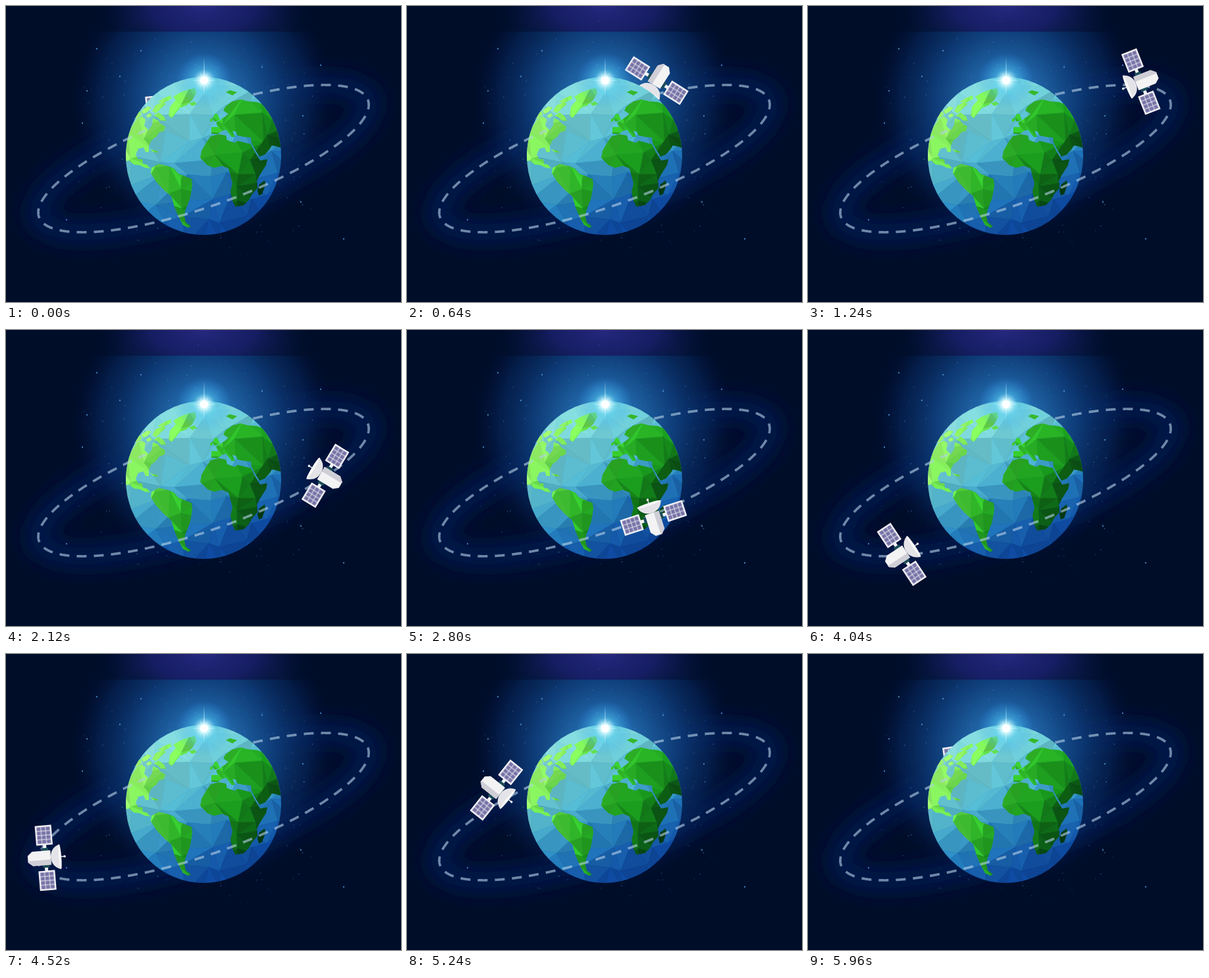
Write an HTML page that moves like this. It is 600 px wide and 450 px high and loops after 6 s.

```html
<!DOCTYPE html>
<html lang="en">
<head>
<meta charset="utf-8">
<title>Satellite in orbit</title>
<style>
html, body { margin: 0; width: 100%; height: 100%; overflow: hidden; background: #000d29; }
svg { display: block; width: 600px; height: 450px; }
</style>
</head>
<body>
<svg viewBox="0 0 600 450">
  <defs>
    <radialGradient id="halo">
      <stop offset="0" stop-color="#2f86cc"/>
      <stop offset=".3" stop-color="#1d5e9f"/>
      <stop offset=".55" stop-color="#0f3f7d" stop-opacity=".9"/>
      <stop offset=".8" stop-color="#07285f" stop-opacity=".6"/>
      <stop offset="1" stop-color="#021340" stop-opacity="0"/>
    </radialGradient>
    <radialGradient id="indigo">
      <stop offset="0" stop-color="#26287f"/>
      <stop offset=".5" stop-color="#1b1f6c" stop-opacity=".8"/>
      <stop offset="1" stop-color="#0a1545" stop-opacity="0"/>
    </radialGradient>
    <radialGradient id="flare">
      <stop offset="0" stop-color="#fff"/>
      <stop offset=".16" stop-color="#d8fbff" stop-opacity=".95"/>
      <stop offset=".4" stop-color="#57d0f8" stop-opacity=".5"/>
      <stop offset="1" stop-color="#2f9cf0" stop-opacity="0"/>
    </radialGradient>
    <filter id="blur" x="-20%" y="-60%" width="140%" height="220%"><feGaussianBlur stdDeviation="13"/></filter>
    <clipPath id="below"><rect y="39" width="600" height="411"/></clipPath>
    <clipPath id="above"><rect width="600" height="39"/></clipPath>
    <clipPath id="disc"><ellipse cx="300" cy="228" rx="118" ry="120"/></clipPath>
    <clipPath id="coast"><path d="
      M181 236L183 205 190 185 198 172 206 168 212 172 210 182 217 189 222 181 223 171 230 173 235 179 242 183 240 190 233 192 228 199 221 204 217 212 217 222 212 222 209 215 201 217 197 226 201 233 207 233 208 240 214 241 219 247 211 246 203 242 194 241 187 235Z
      M194 170L197 163 205 160 206 166 199 171Z
      M206 159L214 153 221 154 215 161 208 164Z
      M222 160L227 151 238 146 243 149 235 156 228 163Z
      M224 167L232 162 240 168 243 175 235 174 230 169Z
      M213 166L219 163 222 167 215 170Z
      M230 146L240 140 250 136 251 141 240 147Z
      M247 167L249 153 258 143 254 138 264 132 276 127 287 125 289 132 283 143 274 151 264 155 257 164 252 170Z
      M278 148L286 145 290 149 283 152Z
      M219 218L229 220 232 223 224 222Z
      M221 246L232 240 245 243 255 247 262 255 282 263 283 272 281 285 279 294 275 304 272 312 271 320 273 329 281 335 277 337 269 333 262 320 256 306 251 289 240 280 228 267 220 254Z
      M311 198L323 195 334 197 336 204 347 208 352 205 364 208 372 210 378 222 386 235 397 233 395 242 386 256 381 266 382 277 374 286 369 295 361 303 348 305 344 296 341 282 344 270 341 258 338 247 328 243 316 246 306 242 295 231 297 220 304 208Z
      M385 271L393 265 394 272 389 286 384 288 382 280Z
      M312 194L312 184 322 184 319 177 326 173 333 168 338 164 330 159 333 153 344 145 356 142 368 145 381 146 394 151 424 190 424 218 413 214 404 212 400 218 393 226 385 229 379 219 373 208 372 200 362 199 352 197 349 191 344 190 348 199 343 199 334 188 328 190 321 195Z
      M317 176L314 171 317 164 321 164 325 173Z
      M310 172L314 170 314 175 310 176Z
      M334 131L340 128 351 131 344 136Z
      M416 214L420 205 424 225Z"/></clipPath>
    <pattern id="cells" width="6.5" height="7" patternUnits="userSpaceOnUse" x="-13" y="-10.5">
      <path d="M0 0H6.5V7H0Z" fill="#e9e7f2"/><path d="M.5 .5H6V6.5H.5Z" fill="#7773a6"/>
    </pattern>
    <g id="panel">
      <path d="M-15-12.5H15V12.5H-15Z" fill="#f4f3f7"/>
      <path d="M-13-10.5H13V10.5H-13Z" fill="url(#cells)"/>
    </g>
  </defs>

  <rect width="600" height="450" fill="#000d29"/>
  <ellipse cx="300" cy="232" rx="265" ry="72" transform="rotate(-19.6 300 232)" fill="none" stroke="#041848" stroke-width="40" filter="url(#blur)"/>
  <ellipse id="glow" cx="300" cy="145" rx="200" ry="210" fill="url(#halo)" clip-path="url(#below)"/>
  <ellipse cx="300" cy="145" rx="200" ry="210" fill="url(#halo)" clip-path="url(#above)" opacity=".4"/>
  <ellipse cx="300" cy="0" rx="160" ry="82" fill="url(#indigo)" clip-path="url(#above)"/>
  <g id="stars"></g>
  <path id="orbit" fill="none" stroke="#b4cfe6" stroke-opacity=".62" stroke-width="3.7" stroke-dasharray="15 11.07"/>

  <g id="planet">
    <g clip-path="url(#disc)">
      <g id="sea"></g>
      <g id="land" clip-path="url(#coast)"></g>
      <use href="#orbit"/>
    </g>
    <circle cx="301" cy="113" r="42" fill="url(#flare)"/>
    <path id="rays" fill="#dffaff" opacity=".65"/>
    <circle cx="301" cy="113" r="6" fill="#fff"/>
  </g>

  <g id="sat">
    <path d="M-20 0H20" stroke="#f1f1f4" stroke-width="5"/>
    <path d="M-15-5H15V5H-15Z" fill="#1b4d58"/>
    <use href="#panel" x="-34.5"/><use href="#panel" x="34.5"/>
    <path d="M-11-8H11V20L5 27H-5L-11 20Z" fill="#f3f3f4"/>
    <path d="M3-8H11V20L5 27H3Z" fill="#cfced6"/>
    <path d="M-19-22Q-14-8 0-8T19-22Z" fill="#e4e4e8"/>
    <ellipse cy="-22" rx="19" ry="2" fill="#fafafa"/>
    <path d="M0-22V-29" stroke="#e8e8ee" stroke-width="1.5"/>
    <circle cy="-29" r="1.8" fill="#e8e8ee"/>
  </g>
</svg>
<script>
const $ = id => document.getElementById(id);
const TILT = -19.6 * Math.PI / 180, LOOP = 6000;
let seed = 11;
const rand = () => (seed = seed * 16807 % 2147483647) / 2147483647;
const clamp = (v, a, b) => Math.max(a, Math.min(b, v));
const tilt = (u, v, cx, cy) => [
  cx + u * Math.cos(TILT) - v * Math.sin(TILT),
  cy + u * Math.sin(TILT) + v * Math.cos(TILT)
];

// Colour at k (0..1) along evenly spaced stops, with a brightness factor
function shade(stops, k, gain) {
  const p = clamp(k, 0, .999) * (stops.length - 1), i = Math.floor(p);
  return `rgb(${stops[i].map((c, j) => Math.round(clamp((c + (stops[i + 1][j] - c) * (p - i)) * gain, 0, 255)))})`;
}

// Low-poly surface: a jittered grid split into triangles
function facets(id, step, stops, depth, vary) {
  const n = Math.ceil(280 / step), pts = [];
  for (let j = 0; j <= n; j++) for (let i = 0; i <= n; i++)
    pts.push([165 + (i + (rand() - .5) * .8) * step, 90 + (j + (rand() - .5) * .8) * step]);
  let out = '';
  const tri = (...q) => {
    const x = (q[0][0] + q[1][0] + q[2][0]) / 3, y = (q[0][1] + q[1][1] + q[2][1]) / 3;
    const c = shade(stops, depth(x, y), 1 + (rand() - .5) * vary);
    out += `<path d="M${q.map(p => p.map(v => v.toFixed(1))).join('L')}Z" fill="${c}" stroke="${c}" stroke-width=".6"/>`;
  };
  for (let j = 0; j < n; j++) for (let i = 0; i < n; i++) {
    const k = j * (n + 1) + i;
    const a = pts[k], b = pts[k + 1], c = pts[k + n + 1], d = pts[k + n + 2];
    if (rand() < .5) { tri(a, b, c); tri(b, d, c); }
    else { tri(a, b, d); tri(a, d, c); }
  }
  $(id).innerHTML = out;
}
facets('sea', 34, [[142, 216, 215], [115, 205, 211], [80, 178, 202], [36, 125, 186], [14, 72, 156]],
  (x, y) => ((x - 230) * .45 + (y - 110) * .9) / 240, .13);
facets('land', 27, [[180, 248, 125], [130, 238, 90], [55, 200, 45], [22, 138, 25], [6, 62, 18]],
  (x, y) => ((x - 185) * .9 + (y - 130) * .6) / 280, .26);

// Stars: faint dust and a few brighter points
let dots = '';
const star = (x, y, r, o) => dots += `<circle cx="${x}" cy="${y}" r="${r}" fill="#58a6e8" opacity="${o}"/>`;
for (let i = 0; i < 240; i++) {
  const a = rand() * 2 * Math.PI, d = 80 + rand() * 125;
  star(300 + d * Math.cos(a), 205 + d * .9 * Math.sin(a), .35 + rand() * .5, .2 + rand() * .45);
}
[[205, 68], [138, 65], [389, 93], [123, 129], [451, 167], [513, 354], [92, 325], [448, 298], [173, 107], [116, 178], [478, 90]]
  .forEach(p => star(...p, 1.2, .7));
$('stars').innerHTML = dots;

// Thin spikes around the flare
let rays = '';
for (let i = 0; i < 12; i++) {
  const a = i * Math.PI / 6, len = i === 9 ? 36 : i === 3 ? 25 : i % 3 ? 13 : 22;
  const c = Math.cos(a), s = Math.sin(a);
  rays += `M${301 - s} ${113 + c}L${301 + c * len} ${113 + s * len}L${301 + s} ${113 - c}Z`;
}
$('rays').setAttribute('d', rays);

// Dashed orbit, open where it passes behind the planet
const line = [];
for (let deg = -67; deg <= 255; deg += .5) {
  const a = deg * Math.PI / 180;
  line.push(tilt(265.2 * Math.cos(a), 72.2 * Math.sin(a), 300, 232).map(v => v.toFixed(2)));
}
$('orbit').setAttribute('d', 'M' + line.join('L'));

// The satellite runs along its own, slightly rounder ellipse
const track = document.createElementNS('http://www.w3.org/2000/svg', 'path');
track.setAttribute('d', 'M252 0A252 86 0 0 1-252 0A252 86 0 0 1 252 0');
const total = track.getTotalLength();
const svg = document.querySelector('svg'), sat = $('sat'), planet = $('planet');

function frame() {
  const t = Math.floor(performance.now() % LOOP / 40) * 40;
  const drift = 24 * Math.exp(-(((t - 1240) / 500) ** 2)) - 6 * Math.sin(2 * Math.PI * t / LOOP - .6);
  const p = track.getPointAtLength((835 + total * t / LOOP + drift) % total);
  const [x, y] = tilt(p.x, p.y, 297, 224);
  sat.setAttribute('transform', `translate(${x} ${y}) rotate(${174 + 360 * t / LOOP})`);
  const next = p.y < 0 ? planet : null;
  if (sat.nextElementSibling !== next) svg.insertBefore(sat, next);
  requestAnimationFrame(frame);
}
frame();
</script>
</body>
</html>
```
